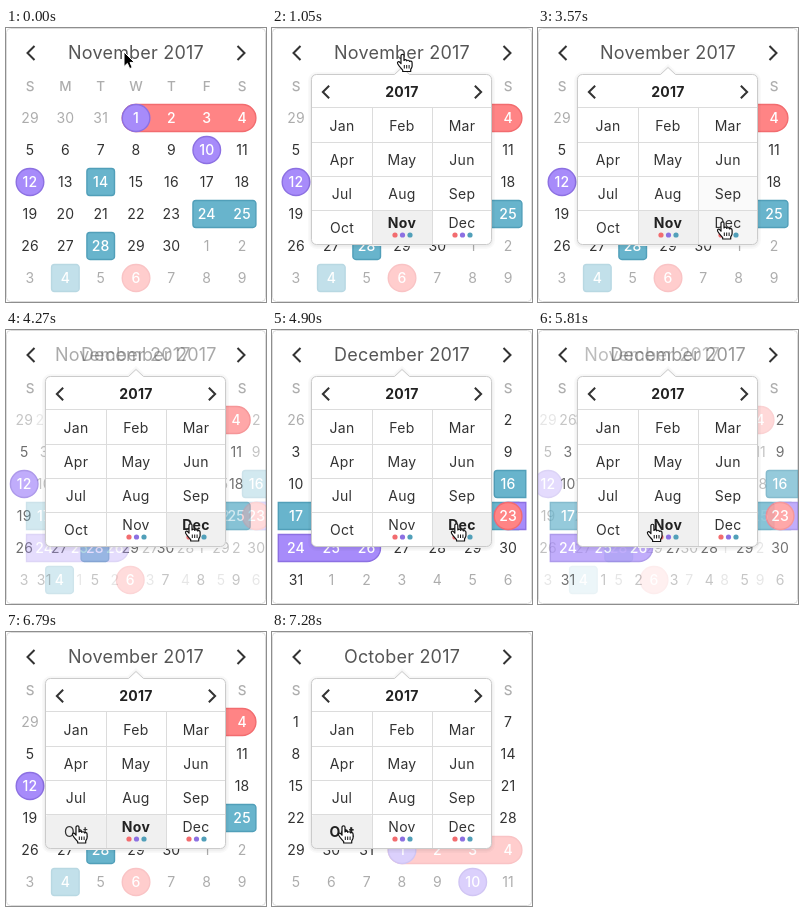
Write an HTML page that moves like this. It is 260 px wide and 274 px high and loops after 8050 ms.

```html
<!DOCTYPE html>
<html lang="en">
<head>
<meta charset="utf-8">
<title>Month picker</title>
<style>
html, body { margin: 0; width: 100%; height: 100%; overflow: hidden; background: #fff; }
svg { display: block; width: 260px; height: 274px; }
text { font-family: Inter, "Open Sans", sans-serif; text-anchor: middle; fill: #333; }
.title { font-size: 18px; letter-spacing: .2px; fill: #555; }
.weekday { font-size: 13.5px; font-weight: 500; fill: #adadad; }
.day { font-size: 14px; letter-spacing: .2px; }
.day.on { fill: #fff; font-weight: 500; }
.month { font-size: 14px; letter-spacing: .3px; }
.bold { font-weight: 700; fill: #222; }
.chevron { fill: none; stroke: #333; stroke-width: 2; }
.line { stroke: #dcdcdc; fill: none; }
</style>
</head>
<body>
<svg id="stage" viewBox="0 0 260 274"></svg>
<script>
const LOOP = 8050;
const NS = 'http://www.w3.org/2000/svg';
const stage = document.getElementById('stage');

function add(parent, tag, attrs = {}, text) {
  const el = document.createElementNS(NS, tag);
  for (const k in attrs) el.setAttribute(k, attrs[k]);
  if (text !== undefined) el.textContent = text;
  parent.appendChild(el);
  return el;
}
const set = (el, attrs) => { for (const k in attrs) el.setAttribute(k, attrs[k]); };
const clamp = v => Math.max(0, Math.min(1, v));
const ease = v => { v = clamp(v); return v * v * (3 - 2 * v); };

const COLORS = {
  pink: ['#ff8485', '#f26c6f'],
  purple: ['#a78bfa', '#8c70e2'],
  teal: ['#68b4cc', '#519fb9']
};
const ROUND = 14, SQUARE = 3;
const COL = 35.35;
const colX = c => 24 + COL * c;
const rowY = r => 90 + 32 * r;

// marks: [first cell, last cell, color, corner radius]
const MONTHS = [
  { name: 'October', start: 0, days: 31, before: 30,
    marks: [[31, 34, 'pink', ROUND], [31, 31, 'purple', ROUND], [40, 40, 'purple', ROUND]] },
  { name: 'November', start: 3, days: 30, before: 31,
    marks: [[3, 6, 'pink', ROUND], [3, 3, 'purple', ROUND], [12, 12, 'purple', ROUND],
      [14, 14, 'purple', ROUND], [16, 16, 'teal', SQUARE], [26, 27, 'teal', SQUARE],
      [30, 30, 'teal', SQUARE], [36, 36, 'teal', SQUARE], [38, 38, 'pink', ROUND]] },
  { name: 'December', start: 5, days: 31, before: 30,
    marks: [[2, 2, 'teal', SQUARE], [8, 8, 'teal', SQUARE], [10, 10, 'pink', ROUND],
      [20, 27, 'teal', SQUARE], [27, 30, 'purple', ROUND], [27, 27, 'pink', ROUND]] }
];
const OCT = 0, NOV = 1, DEC = 2;

// One row of a mark; an end that runs on to another week is cut square.
function barPath(x1, x2, y, rl, rr) {
  const t = y - 13.5, b = y + 13.5;
  const l = Math.min(rl, 13.5), r = Math.min(rr, 13.5);
  return `M${x1 + l} ${t}H${x2 - r}a${r} ${r} 0 0 1 ${r} ${r}V${b - r}` +
    `a${r} ${r} 0 0 1 ${-r} ${r}H${x1 + l}a${l} ${l} 0 0 1 ${-l} ${-l}V${t + l}a${l} ${l} 0 0 1 ${l} ${-l}Z`;
}

function buildWeeks(m) {
  const g = add(stage, 'g');
  const bright = add(g, 'g'), dim = add(g, 'g', { opacity: .4 });
  const inMonth = i => i >= m.start && i < m.start + m.days;
  const marked = new Set();
  for (const [a, z, color, radius] of m.marks) {
    for (let i = a; i <= z; i++) marked.add(i);
    for (let r = Math.floor(a / 7); r <= Math.floor(z / 7); r++) {
      const from = Math.max(a, r * 7), to = Math.min(z, r * 7 + 6);
      const x1 = colX(from % 7) - (from === a ? 13.8 : COL / 2);
      const x2 = colX(to % 7) + (to === z ? 13.8 : COL / 2);
      const d = barPath(x1, x2, rowY(r), from === a ? radius : 0, to === z ? radius : 0);
      add(inMonth(from) ? bright : dim, 'path',
        { d, fill: COLORS[color][0], stroke: COLORS[color][1], 'stroke-width': 1.4 });
    }
  }
  for (let i = 0; i < 42; i++) {
    const n = i - m.start + 1;
    const label = n < 1 ? n + m.before : n > m.days ? n - m.days : n;
    add(inMonth(i) ? bright : dim, 'text', {
      x: colX(i % 7), y: rowY(Math.floor(i / 7)) + 5, class: marked.has(i) ? 'day on' : 'day'
    }, label);
  }
  return g;
}

// Calendar
add(stage, 'rect', { x: .5, y: .5, width: 259, height: 273, rx: 4, class: 'line', fill: '#fff' });
const chevron = (parent, x, y, s) =>
  add(parent, 'path', { d: `M${x - 3.5 * s} ${y - 7 * Math.abs(s)}L${x + 3.5 * s} ${y}L${x - 3.5 * s} ${y + 7 * Math.abs(s)}`, class: 'chevron' });
chevron(stage, 25, 25, -1);
chevron(stage, 235, 25, 1);
[...'SMTWTFS'].forEach((d, i) => add(stage, 'text', { x: colX(i), y: 63, class: 'weekday' }, d));
const titles = MONTHS.map(m => add(stage, 'text', { x: 130, y: 31.3, class: 'title' }, m.name + ' 2017'));
const weeks = MONTHS.map(buildWeeks);

// Popover
const pop = add(stage, 'g');
const OUTLINE = 'M44.5 46.5H122.5L130 39.5L137.5 46.5H214.5a5 5 0 0 1 5 5V211.5a5 5 0 0 1 -5 5H44.5a5 5 0 0 1 -5 -5V51.5a5 5 0 0 1 5 -5Z';
for (const w of [7, 4, 2]) {
  add(pop, 'path', { d: OUTLINE, fill: 'none', stroke: '#000', 'stroke-opacity': .025, 'stroke-width': w, transform: 'translate(0 1)' });
}
add(pop, 'path', { d: OUTLINE, fill: '#fff' });
chevron(pop, 54, 64, -.9);
chevron(pop, 206, 64, .9);
const year = add(pop, 'text', { x: 130, y: 69.2, class: 'month bold' }, '2017');
const cells = 'Jan Feb Mar Apr May Jun Jul Aug Sep Oct Nov Dec'.split(' ').map((name, i) => {
  const x = 40 + 60 * (i % 3), y = 80 + 34 * Math.floor(i / 3);
  const dots = i > 9;
  const bg = add(pop, 'rect', { x, y, width: 60, height: i > 8 ? 36 : 34, rx: i === 9 || i === 11 ? 4 : 0, fill: '#f0f0f0' });
  const label = add(pop, 'text', { x: x + 30, y: y + (dots ? 18 : 23) }, name);
  if (dots) Object.values(COLORS).forEach((c, k) =>
    add(pop, 'circle', { cx: x + 23 + 7.5 * k, cy: 207, r: 2.6, fill: c[1] }));
  return { x, y, bg, label };
});
add(pop, 'path', { d: 'M40 79.5H219M40 114.5H219M40 148.5H219M40 182.5H219M100.5 80V216M160.5 80V216', class: 'line' });
add(pop, 'path', { d: OUTLINE, fill: 'none', stroke: '#cbcbcb' });

// Pointer
const ring = add(stage, 'circle', { r: 31, fill: 'none', stroke: '#888', 'stroke-width': 1.5 });
const arrow = add(stage, 'path', {
  d: 'M0 0V14.5L3.4 11.4L5.7 16.6L8.2 15.5L6 10.4H10.4Z', fill: '#000', stroke: '#fff', 'stroke-width': 1
});
const hand = add(stage, 'g');
add(hand, 'path', {
  d: 'M-1.5 1.2C-1.5 -.7 1.5 -.7 1.5 1.2V6C1.8 4.8 4.1 4.9 4.3 6.3C4.8 5.4 6.8 5.6 7 6.9C7.6 6.2 9.6 6.6 9.6 8.2V11.5C9.6 13.4 8.4 14 8.2 15.2V17H.2V15.6C-1.4 13.6 -3.5 11.6 -4.8 9.2C-5.6 7.4 -3.6 6.4 -2.6 7.8L-1.5 9.2Z',
  fill: '#fff', stroke: '#111', 'stroke-width': 1.2, 'stroke-linejoin': 'round'
});
add(hand, 'path', { d: 'M1.8 10.5V14M4.2 10.5V14M6.6 10.5V14', stroke: '#111', 'stroke-width': 1 });

// Pointer track: time, x, y
const TRACK = [
  [70, 118, 24], [500, 130.5, 26.5], [2170, 130.5, 26.5], [2450, 130, 55], [2620, 130.5, 73],
  [2730, 131, 95], [2940, 131, 128], [3010, 131, 129], [3300, 155, 168], [3570, 184.5, 194],
  [4900, 184.5, 194], [5180, 136, 194.5], [5530, 136, 194.5], [5810, 114.5, 194.5],
  [6230, 76, 193], [6370, 75, 193], [6510, 71.5, 194], [LOOP, 71.5, 194]
];
function pointer(t) {
  if (t <= TRACK[0][0]) return TRACK[0].slice(1);
  const i = TRACK.findIndex(k => k[0] >= t);
  const [t0, x0, y0] = TRACK[i - 1], [t1, x1, y1] = TRACK[i];
  const p = (t - t0) / (t1 - t0);
  return [x0 + (x1 - x0) * p, y0 + (y1 - y0) * p];
}

// Share of the last 200 ms spent inside a box, used as a soft hover.
function hover(t, x, y, w, h) {
  let n = 0;
  for (let i = 0; i < 6; i++) {
    const [px, py] = pointer(Math.max(0, t - i * 40));
    if (px >= x && px < x + w && py >= y && py < y + h) n++;
  }
  return n / 6;
}

const CLICKS = [3850, 5250, 6650];
const SLIDES = [
  { pick: 4130, title: 4145, weeks: 4182, from: NOV, to: DEC, dir: -1 },
  { pick: 5670, title: 5705, weeks: 5720, from: DEC, to: NOV, dir: 1 },
  { pick: 7035, title: 7020, weeks: 7030, from: NOV, to: OCT, dir: 1 }
];

function slide(parts, key, t, dist) {
  const s = SLIDES.filter(v => t >= v[key]).pop();
  const p = s ? ease((t - s[key]) / 250) : 1;
  const to = s ? s.to : NOV;
  parts.forEach((el, i) => {
    let a = 0, dx = 0;
    if (i === to) { a = p; dx = s ? -s.dir * dist * (1 - p) : 0; }
    else if (s && i === s.from) { a = 1 - p; dx = s.dir * dist * p; }
    set(el, { opacity: a, transform: `translate(${dx} 0)`, visibility: a > 0 ? 'visible' : 'hidden' });
  });
}

function draw(t) {
  slide(titles, 'title', t, 26);
  slide(weeks, 'weeks', t, 20);

  const open = ease((t - 190) / 250);
  set(pop, { opacity: open, transform: `translate(0 ${-10 * (1 - open)})` });
  set(year, { opacity: 1 - .5 * hover(t, 100, 50, 60, 29) });

  const picked = SLIDES.filter(s => t >= s.pick).pop();
  const active = 9 + (picked ? picked.to : NOV);
  cells.forEach((c, i) => {
    set(c.bg, { opacity: i === active ? 1 : hover(t, c.x, c.y, 60, 34) });
    set(c.label, { class: i === active ? 'month bold' : 'month' });
  });

  const [x, y] = pointer(t);
  const at = `translate(${x} ${y})`;
  const isHand = t >= 140;
  set(arrow, { transform: at, visibility: isHand ? 'hidden' : 'visible' });
  set(hand, { transform: at, visibility: isHand ? 'visible' : 'hidden' });
  const age = Math.min(...CLICKS.map(c => t >= c ? t - c : LOOP));
  set(ring, { cx: x, cy: y, opacity: .3 * clamp(1 - age / 140) });
}

const begin = performance.now();
function tick() {
  draw((performance.now() - begin) % LOOP);
  requestAnimationFrame(tick);
}
tick();
</script>
</body>
</html>
```
